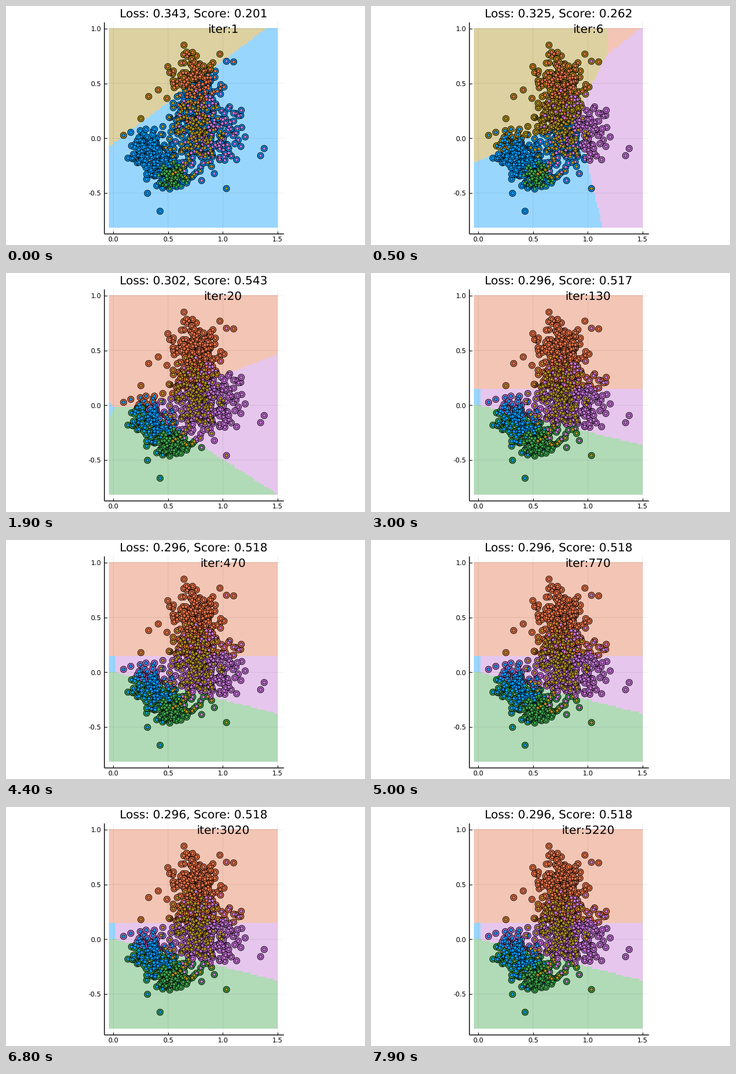
These frames come from a looping animation (600 by 400 pixels, 8 s). A matplotlib script:

```python
import numpy as np
import matplotlib.pyplot as plt
from matplotlib.animation import FuncAnimation

WIDTH, HEIGHT, DPI = 600, 400, 100
FRAMES, INTERVAL = 80, 100
PT = 72 / DPI  # points per pixel
plt.rcParams.update({"font.family": "DejaVu Sans", "text.hinting": "none"})

BLUE, ORANGE, GREEN, PURPLE, TAN = range(5)
COLORS = np.array([[0, 154, 250], [226, 111, 70], [61, 164, 77],
                   [194, 113, 210], [172, 141, 24]]) / 255
PALE = 1 - 0.4 * (1 - COLORS)

LEFT, RIGHT, TOP, BOTTOM = 172, 454, 37.7, 371
CELLS = 100


# ---- data: one tilted, truncated normal cloud per class ----
def make_cloud(rng, count, centre, spread, tilt=0.0):
    z = rng.normal(size=(count * 2, 2))
    z = z[np.hypot(*z.T) < 2.4][:count] * spread
    z[:, 1] += tilt * z[:, 0]
    return z + centre


rng = np.random.default_rng(7)
clouds = {
    BLUE: make_cloud(rng, 180, (248, 252), (21, 21), 0.35),
    ORANGE: make_cloud(rng, 180, (316, 137), (21, 27)),
    GREEN: make_cloud(rng, 140, (279, 284), (11, 10)),
    PURPLE: make_cloud(rng, 190, (338, 214), (29, 33)),
    TAN: make_cloud(rng, 170, (310, 212), (23, 36)),
}
strays = {
    BLUE: [(257, 343), (236, 313), (196, 216)],
    ORANGE: [(297, 65), (270, 101), (357, 80), (380, 93), (254, 140), (238, 151)],
    PURPLE: [(368, 92), (431, 238), (425, 250)],
    TAN: [(225, 188), (368, 305)],
}
groups = [np.vstack([cloud, *strays.get(k, [])]) for k, cloud in clouds.items()]
points = np.vstack(groups) + 0.5
labels = np.repeat(np.arange(5), [len(g) for g in groups])


# ---- classifier: the class with the highest linear score wins ----
def plane(a, b, u, v):
    """Score a*x + b*y + c that is zero at (u, v)."""
    return a, b, -a * u - b * v


def flat(c):
    return 0, 0, c


def model(blue, orange, green, purple, tan):
    return np.array([blue, orange, green, purple, tan])


def settled(slope):
    return model(blue=plane(-0.27, 0, 183, 0), orange=plane(0, -1, 0, 195.5),
                 green=plane(-slope, 1, 183, 222), purple=flat(0), tan=flat(-60))


start = model(blue=flat(0), orange=flat(-120), green=flat(-120),
              purple=flat(-120), tan=plane(-0.753, -1, 172, 236))
split = model(blue=plane(-0.015, 0.6, 298, 312), orange=plane(0.62, -1, 320, 142),
              green=plane(0.95, 0.6, 298, 312),
              purple=plane(1.585, 0.206, 320, 142), tan=flat(0))
merged = model(blue=plane(-0.667, 0.6, 182, 226), orange=flat(0),
               green=plane(0, 1, 228, 226),
               purple=plane(0.246, 0.615, 228, 226), tan=flat(-40))

STAGES = [start, split, merged, settled(0.245), settled(0.255)]
STAGE_FRAMES = [0, 10, 19, 30, 44]
LOSS = [0.343, 0.306, 0.302, 0.296, 0.296]
SCORE = [0.201, 0.322, 0.543, 0.517, 0.518]
ITERATIONS = np.cumsum(np.repeat([1, 10, 50, 200], FRAMES // 4))


def stage_at(frame):
    """Fractional stage index; later stages settle quickly, then slow down."""
    position = np.interp(frame, STAGE_FRAMES, range(len(STAGES)))
    stage, t = divmod(position, 1)
    return stage + (t ** 0.4 if stage >= 2 else t)


def model_at(position):
    i = min(int(position), len(STAGES) - 2)
    return STAGES[i] + (STAGES[i + 1] - STAGES[i]) * (position - i)


def classify(planes, x, y):
    return np.argmax([a * x + b * y + c for a, b, c in planes], axis=0)


steps = (np.arange(CELLS) + 0.5) / CELLS
grid_x, grid_y = np.meshgrid(LEFT + steps * (RIGHT - LEFT),
                             TOP + steps * (BOTTOM - TOP))


# ---- figure ----
fig = plt.figure(figsize=(WIDTH / DPI, HEIGHT / DPI), dpi=DPI, facecolor="white")
ax = fig.add_axes([0, 0, 1, 1])
regions = ax.imshow(np.ones((CELLS, CELLS, 3)), interpolation="nearest",
                    extent=(LEFT, RIGHT, BOTTOM, TOP), aspect="auto", zorder=1)
ax.set_xlim(0, WIDTH)
ax.set_ylim(HEIGHT, 0)
ax.axis("off")


def axis_line(xs, ys, width=1.4):
    ax.plot(xs, ys, color="black", lw=width * PT, zorder=6, solid_capstyle="butt")


def grid_line(xs, ys):
    ax.plot(xs, ys, color="black", lw=0.7 * PT, alpha=0.1, zorder=2, snap=False)


def tick_label(x, y, value, ha):
    ax.text(x, y, f"{value:.1f}", fontsize=8, ha=ha, va="baseline")


for value in np.arange(0, 2, 0.5):
    x = 179.4 + 183 * value
    grid_line([x, x], [27, 381])
    axis_line([x, x], [381, 376.5], 1)
    tick_label(x, 394, value, "center")
for value in np.arange(-0.5, 1.5, 0.5):
    y = 221.4 - 183.3 * value
    grid_line([164, 463], [y, y])
    axis_line([164, 168.5], [y, y], 1)
    tick_label(159.3, y + 4, value, "right")
axis_line([163.9, 163.9], [27, 381.2])
axis_line([163.8, 463.5], [380.7, 380.7])


def dots(diameter, edge, zorder):
    return ax.scatter(*points.T, s=(diameter * PT) ** 2, c=COLORS[labels],
                      edgecolors="black", linewidths=edge * PT, zorder=zorder)


outer = dots(10.6, 0.9, 3)
inner = dots(5.4, 0.75, 4)
title = ax.text(313.7, 19, "", fontsize=14, ha="center", va="baseline")
counter = ax.text(362.7, 44.8, "", fontsize=14, ha="center", va="baseline", zorder=7)


def update(frame):
    position = stage_at(frame)
    planes = model_at(position)
    regions.set_data(PALE[classify(planes, grid_x, grid_y)])

    predicted = classify(planes, *points.T)
    order = np.argsort(predicted, kind="stable")
    outer.set_offsets(points[order])
    outer.set_facecolors(COLORS[predicted[order]])

    loss, score = (np.interp(position, range(len(STAGES)), values)
                   for values in (LOSS, SCORE))
    title.set_text(f"Loss: {loss:.3f}, Score: {score:.3f}")
    counter.set_text(f"iter:{ITERATIONS[frame]}")
    return regions, outer, title, counter


animation = FuncAnimation(fig, update, frames=FRAMES, interval=INTERVAL,
                          repeat=True, repeat_delay=0)
plt.show()
```
